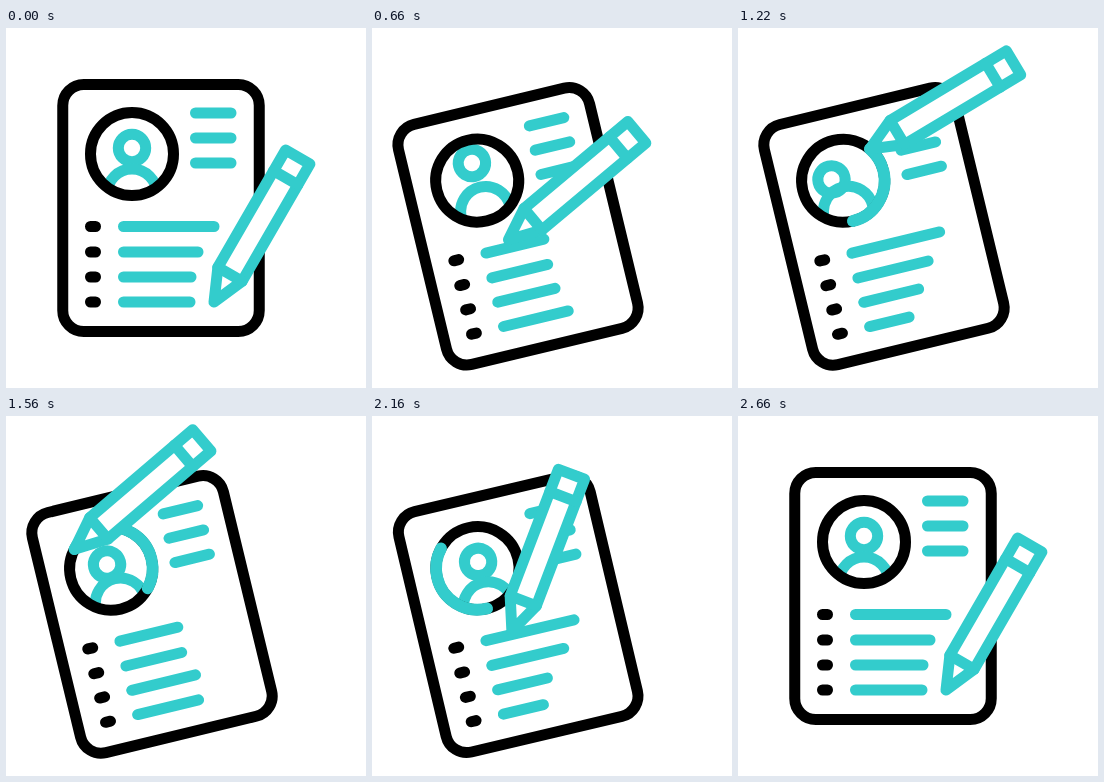
Recreate the animation shown at these times as an HTML page. Size 360x360 px, loop 3 s.

```html
<!DOCTYPE html>
<html lang="en">
<head>
<meta charset="utf-8">
<title>Form and pencil</title>
<style>
html, body { margin: 0; width: 100%; height: 100%; overflow: hidden; background: #fff; }
svg { display: block; width: 100vw; height: 100vh; }
.ink, .teal { fill: none; stroke-width: 11; stroke-linecap: round; stroke-linejoin: round; }
.ink { stroke: #000; }
.teal { stroke: #33cccc; }
#trace { stroke-width: 11.8; }
#pencil path { fill: #fff; }
</style>
</head>
<body>
<svg viewBox="0 0 360 360">
  <clipPath id="disc"><circle cx="126" cy="126" r="43"/></clipPath>
  <g id="doc">
    <rect class="ink" x="56.75" y="56.5" width="196.5" height="247" rx="21"/>
    <g clip-path="url(#disc)">
      <circle class="teal" id="head" cx="126" cy="120" r="13.7"/>
      <circle class="teal" id="body" cx="126" cy="166" r="25"/>
    </g>
    <circle class="ink" cx="126" cy="126" r="41.5"/>
    <path class="teal" id="trace" pathLength="1" d="M126 167.5A41.5 41.5 0 0 0 126 84.5A41.5 41.5 0 0 0 126 167.5"/>
    <path class="ink" d="M84.5 198.5h5M84.5 224h5M84.5 249h5M84.5 274h5"/>
    <path class="teal" d="M189.5 85h35.5M189.5 110h35.5M189.5 135h35.5"/>
    <path class="teal" id="rows"/>
  </g>
  <g id="pencil">
    <path class="teal" d="M0 0L-14 -32V-167.5H14V-32Z"/>
    <path class="teal" d="M-14 -32H14M-14 -143.5H14"/>
  </g>
</svg>
<script>
const LOOP = 3000, TILT = 13.6, RADIUS = 41.5;
const REST = [208, 274];
const START = 200, TOUCH = 800, LIFT = 2000, END = 2600;
// y, full length, start of the first dip, dip period, depth
const ROWS = [
  [198.5, 90.5, 300, 900, 0.38],
  [224, 74.5, 400, 900, 0.37],
  [249, 67.5, 450, 1020, 0.34],
  [274, 66.5, 770, 900, 0.39]
];
const el = id => document.getElementById(id);
const doc = el('doc'), head = el('head'), body = el('body');
const trace = el('trace'), rows = el('rows'), pencil = el('pencil');

const ramp = (t, a, b) => Math.min(1, Math.max(0, (t - a) / (b - a)));
const smooth = x => x * x * (3 - 2 * x);
const linear = x => x;
const mix = (a, b, x) => a + (b - a) * x;

function keys(t, list, ease) {
  let v = list[0][1];
  for (let i = 1; i < list.length; i++) {
    const [a] = list[i - 1], [b, next] = list[i];
    if (t > a) v = mix(list[i - 1][1], next, ease(ramp(t, a, b)));
  }
  return v;
}

// Page point on the portrait ring once the sheet is fully tilted
function ringPoint(p) {
  const turn = TILT * Math.PI / 180;
  const a = Math.PI / 2 - p * 2 * Math.PI;
  const x = 126 + RADIUS * Math.cos(a) - 155, y = 126 + RADIUS * Math.sin(a) - 180;
  const c = Math.cos(turn), s = Math.sin(turn);
  return [146 + x * c + y * s, 198.4 - x * s + y * c];
}

function tip(t) {
  const bottom = ringPoint(0);
  const toward = x => REST.map((r, i) => mix(r, bottom[i], x));
  if (t < TOUCH) return toward(ramp(t, START, TOUCH));
  if (t < LIFT) return ringPoint(ramp(t, TOUCH, LIFT));
  return toward(1 - ramp(t, LIFT, END));
}

function lean(t) {
  if (t < 1350) return keys(t, [[START, 30], [440, 39], [660, 50], [TOUCH, 56], [1350, 60]], linear);
  if (t < LIFT) return mix(60, 17.5, smooth(ramp(t, 1350, LIFT)));
  return mix(17.5, 30, ramp(t, LIFT, END));
}

function rowPath(t) {
  return ROWS.map(([y, len, from, period, depth]) => {
    const x = ramp(t, from, from + 2 * period) * 2 % 1;
    const dip = smooth(1 - Math.abs(2 * x - 1));
    return `M117.5 ${y}h${len * (1 - depth * dip)}`;
  }).join('');
}

// Offsets along one axis: rest, up, left, right, rest
function sway(t, up, left, right) {
  return keys(t, [[200, 0], [680, up], [1220, left], [1900, right], [2360, 0]], smooth);
}

function draw(t) {
  const k = smooth(ramp(t, 200, 680)) - smooth(ramp(t, 2120, END));
  doc.setAttribute('transform',
    `translate(${155 - 9 * k} ${180 + 18.4 * k}) rotate(${-TILT * k}) translate(-155 -180)`);

  head.setAttribute('transform', `translate(${sway(t, -1, -11, 5)} ${sway(t, -12.4, 2, 0)})`);
  body.setAttribute('transform', `translate(${sway(t, 1, -2, 4)} ${sway(t, -8, -9, 0)})`);

  const lead = ramp(t, TOUCH, LIFT), tail = ramp(t, 1400, END);
  trace.style.display = lead > tail ? '' : 'none';
  trace.setAttribute('stroke-dasharray', `${lead - tail} 2`);
  trace.setAttribute('stroke-dashoffset', -tail);

  rows.setAttribute('d', rowPath(t));
  const [x, y] = tip(t);
  pencil.setAttribute('transform', `translate(${x} ${y}) rotate(${lean(t)})`);
}

const t0 = performance.now();
function tick() {
  draw((performance.now() - t0) % LOOP);
  requestAnimationFrame(tick);
}
tick();
</script>
</body>
</html>
```
